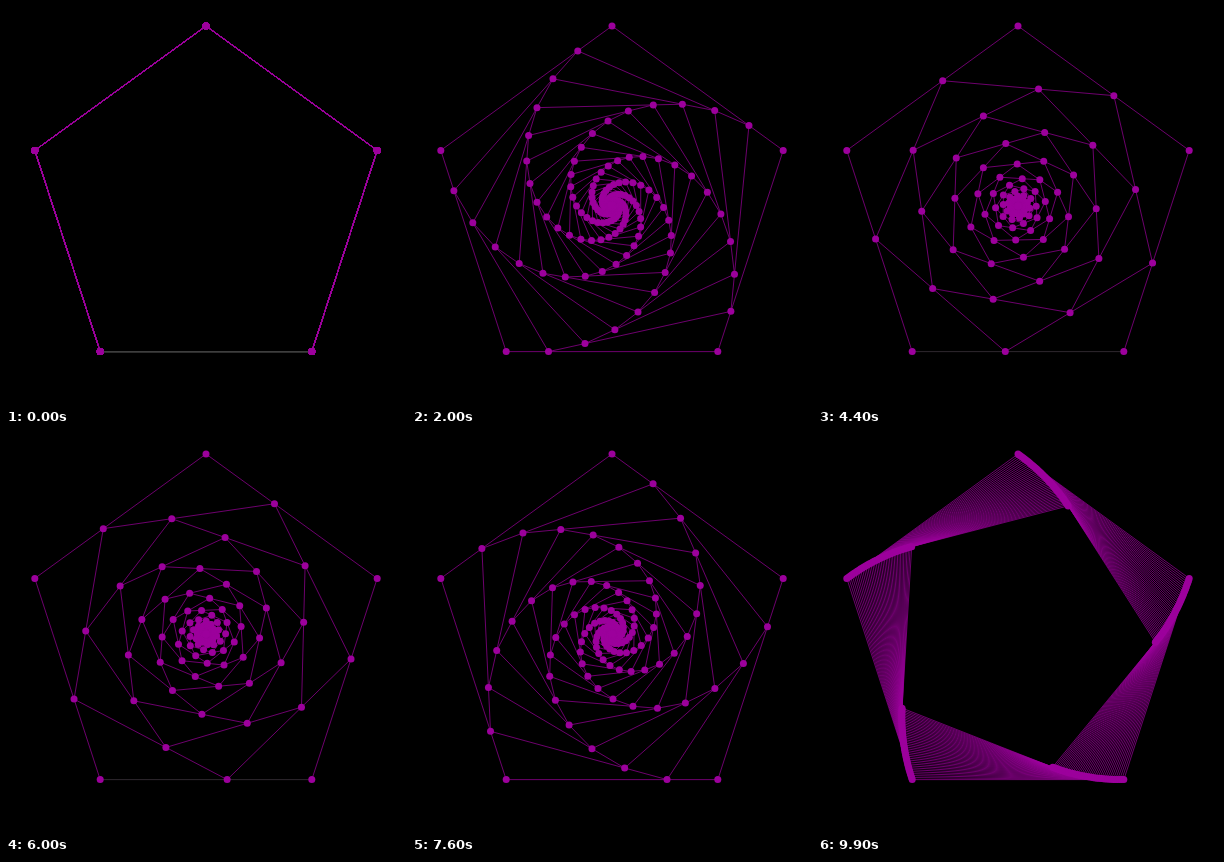
Animation, 400 px wide and 400 px high, one loop 10000 ms. Source, as an HTML page with a canvas:

```html
<!DOCTYPE html>
<html lang="en">
<head>
<meta charset="utf-8">
<title>Nested pentagons</title>
<style>
  html, body { margin: 0; width: 100%; height: 100%; overflow: hidden; background: #000; }
  canvas { display: block; width: 400px; height: 400px; }
</style>
</head>
<body>
<canvas id="stage" width="400" height="400"></canvas>
<script>
const ctx = document.getElementById('stage').getContext('2d');
const SIDES = 5, LEVELS = 40, RADIUS = 180, CENTER = 200;
const STEP_MS = 100, STEPS = 100;
const PURPLE = '#9c009c', DIM = '#443a44', GREY = '#404040';
const BASE = 2; // index of the bottom edge

// Vertices run counterclockwise from the top.
const outer = Array.from({ length: SIDES }, (_, i) => {
  const a = i * 2 * Math.PI / SIDES;
  return [CENTER - RADIUS * Math.sin(a), CENTER - RADIUS * Math.cos(a)];
});

const next = (pts, i) => pts[(i + 1) % SIDES];

const inset = (pts, t) => pts.map(([x, y], i) => {
  const [nx, ny] = next(pts, i);
  return [x + (nx - x) * t, y + (ny - y) * t];
});

function line(a, b, color) {
  ctx.strokeStyle = color;
  ctx.beginPath();
  ctx.moveTo(...a);
  ctx.lineTo(...b);
  ctx.stroke();
}

function dot([x, y]) {
  ctx.beginPath();
  ctx.arc(x, y, 3.5, 0, 2 * Math.PI);
  ctx.fill();
}

function baseColor(step) {
  if (step === 0) return GREY;
  return step >= 40 && step <= 64 ? DIM : PURPLE;
}

function draw(step) {
  ctx.fillStyle = '#000';
  ctx.fillRect(0, 0, 400, 400);
  ctx.fillStyle = PURPLE;
  ctx.lineWidth = 0.7;
  let pts = outer;
  for (let k = 0; k < LEVELS; k++) {
    pts.forEach((p, i) => {
      const isBase = i === BASE && (k === 0 || step === 0);
      line(p, next(pts, i), isBase ? baseColor(step) : PURPLE);
    });
    pts.forEach(dot);
    pts = inset(pts, step / STEPS);
  }
}

const start = performance.now();
let shown = -1;

function tick() {
  const step = Math.floor((performance.now() - start) / STEP_MS) % STEPS;
  if (step !== shown) draw(shown = step);
  requestAnimationFrame(tick);
}
tick();
</script>
</body>
</html>
```
